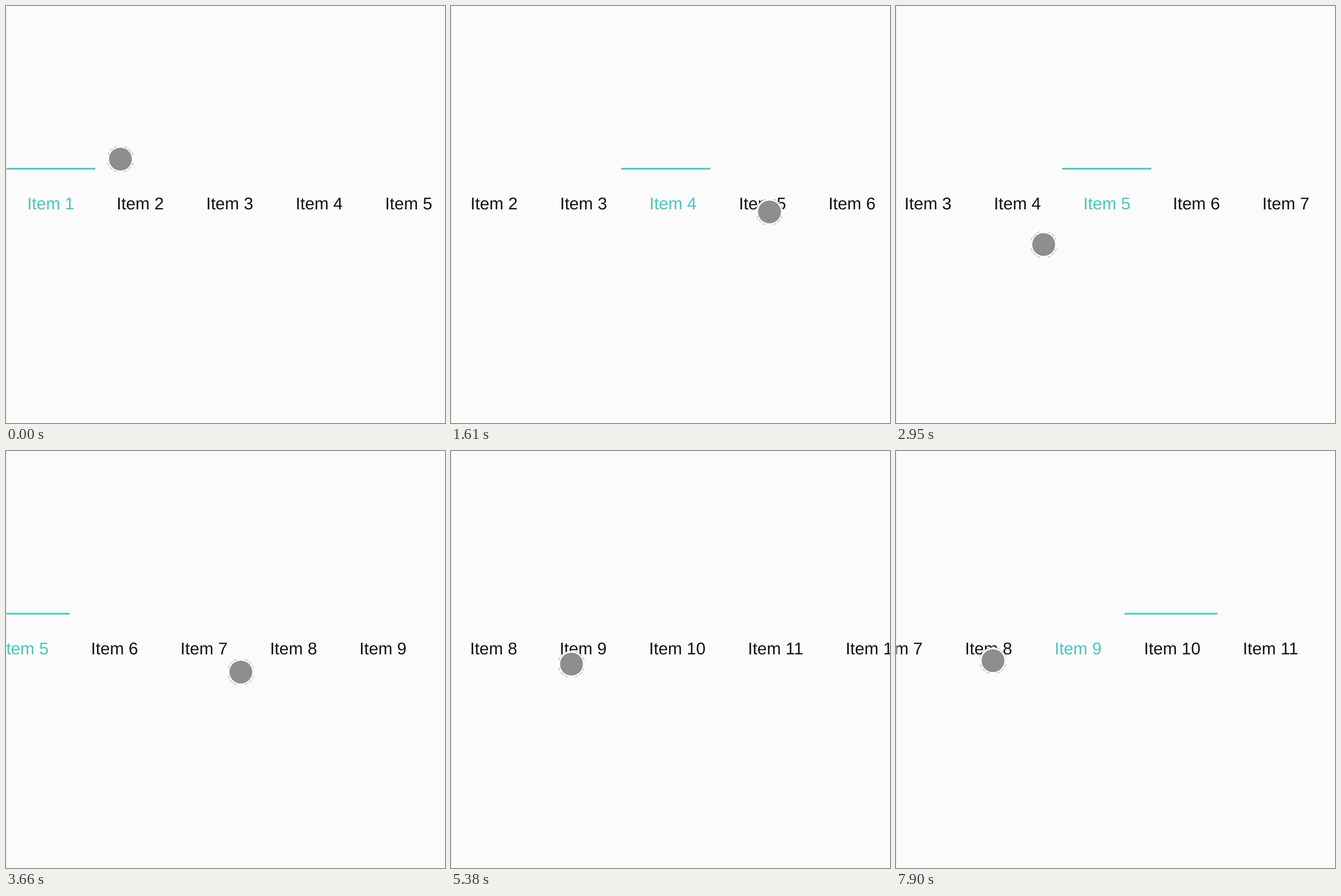
An HTML page that plays this animation: 767x730 px, repeating every 8 s.

```html
<!DOCTYPE html>
<html lang="en">
<head>
<meta charset="utf-8">
<title>Scrolling tabs</title>
<style>
  html, body { margin: 0; width: 100%; height: 100%; overflow: hidden; background: #fbfbfb; }
  .stage { position: relative; width: 767px; height: 730px; overflow: hidden; }
  .stage::after { content: ""; position: absolute; left: 0; top: 0; width: 1px; height: 100%; background: #e9e9e9; }
  .track { position: absolute; left: 0; top: 0; }
  .tabs { position: absolute; left: 0; top: 330px; display: flex; }
  .tab {
    flex: none; padding: 0 37px; white-space: pre; color: #111;
    font: 29.63px/33px "Liberation Sans", Arial, sans-serif;
    text-rendering: geometricPrecision;
  }
  .tab.on { color: #49c5bf; }
  .bar { position: absolute; left: 0; top: 283px; height: 3px; background: #49c5bf; }
  .cursor { position: absolute; left: -25px; top: -25px; width: 50px; height: 50px; }
</style>
</head>
<body>
<div class="stage">
  <div class="track">
    <div class="bar"></div>
    <div class="tabs"></div>
  </div>
  <svg class="cursor" viewBox="-25 -25 50 50">
    <circle r="23.3" fill="#fff"/>
    <circle r="23.2" fill="none" stroke="#8a8a8a" stroke-width=".9" pathLength="144"
            stroke-dasharray="0 7 5 2.5 7 2.5 5 7"/>
    <circle r="20" fill="#8e8e8e"/>
  </svg>
</div>
<script>
const LOOP = 8000, TAU = 190, HALF = 383.5, END = 1150.3, STRIDE = 231;
const TAP_LEAD = 216, SWIPE_LEAD = 42;
const $ = s => document.querySelector(s);
const track = $('.track'), bar = $('.bar'), cursor = $('.cursor');

const tabs = Array.from({ length: 12 }, (_, i) => {
  const el = document.createElement('div');
  el.className = 'tab';
  el.textContent = `Item ${i + 1}`;
  $('.tabs').append(el);
  return { el };
});
let edge = 0;
for (const tab of tabs) {
  tab.x = edge;
  tab.w = tab.el.getBoundingClientRect().width;
  edge += tab.w;
}

const moves = [], glides = [];
const glide = (at, span, x, y) => glides.push({ at, span, x, y });

// A move becomes visible at `at`, already `lead` ms into its decay.
const slide = (at, lead, scroll) => moves.push({ at, lead, scroll });

function tap(at, item) {
  const { x, w } = tabs[item - 1];
  const scroll = Math.min(END, x + w / 2 - HALF);
  moves.push({ at, lead: TAP_LEAD, item, x, w, scroll });
}

// Return to the right side, then pull left to (x, y)
function swipe(at, startY, x, y) {
  glide(at - 450, 400, 734, startY);
  glide(at, 190, x, y);
}

glide(20, 550, 556.5, 360.5);
tap(1140, 4);
tap(1850, 5);
swipe(2760, 362, 258, 417.5);
swipe(3960, 322, 205, 299);
swipe(4830, 344, 210.5, 373);
slide(2850, TAP_LEAD, 338.5);
for (let i = 0; i < 3; i++) slide(3140 + 1000 * i, SWIPE_LEAD, END - STRIDE * (2 - i));
glide(5390, 490, 694.5, 375.5);
tap(6330, 12);
glide(6950, 470, 169.5, 367);
tap(7900, 9);

// Value of one property after every move begun by time t
function follow(key, start, t) {
  const list = moves.filter(m => key in m && m.at <= t);
  return list.reduce((v, m, i) => {
    const until = i + 1 < list.length ? list[i + 1].at : t;
    return m[key] + (v - m[key]) * Math.exp(-(until - m.at + m.lead) / TAU);
  }, start);
}

function pointer(t) {
  let x = 200, y = 268;
  for (const g of glides) {
    const u = Math.min(1, Math.max(0, (t - g.at) / g.span));
    const k = u * u * (3 - 2 * u);
    x += (g.x - x) * k;
    y += (g.y - y) * k;
  }
  return [x, y];
}

function draw(t) {
  track.style.transform = `translateX(${-follow('scroll', 0, t)}px)`;
  bar.style.transform = `translate(${follow('x', 0, t)}px, .4px)`;
  bar.style.width = `${follow('w', tabs[0].w, t)}px`;
  const active = moves.reduce((n, m) => (m.item && m.at <= t ? m.item : n), 1);
  tabs.forEach((tab, i) => tab.el.classList.toggle('on', i + 1 === active));
  const [x, y] = pointer(t);
  cursor.style.transform = `translate(${x}px, ${y}px)`;
}

const begin = performance.now();
function tick() {
  draw((performance.now() - begin) % LOOP);
  requestAnimationFrame(tick);
}
tick();
</script>
</body>
</html>
```
